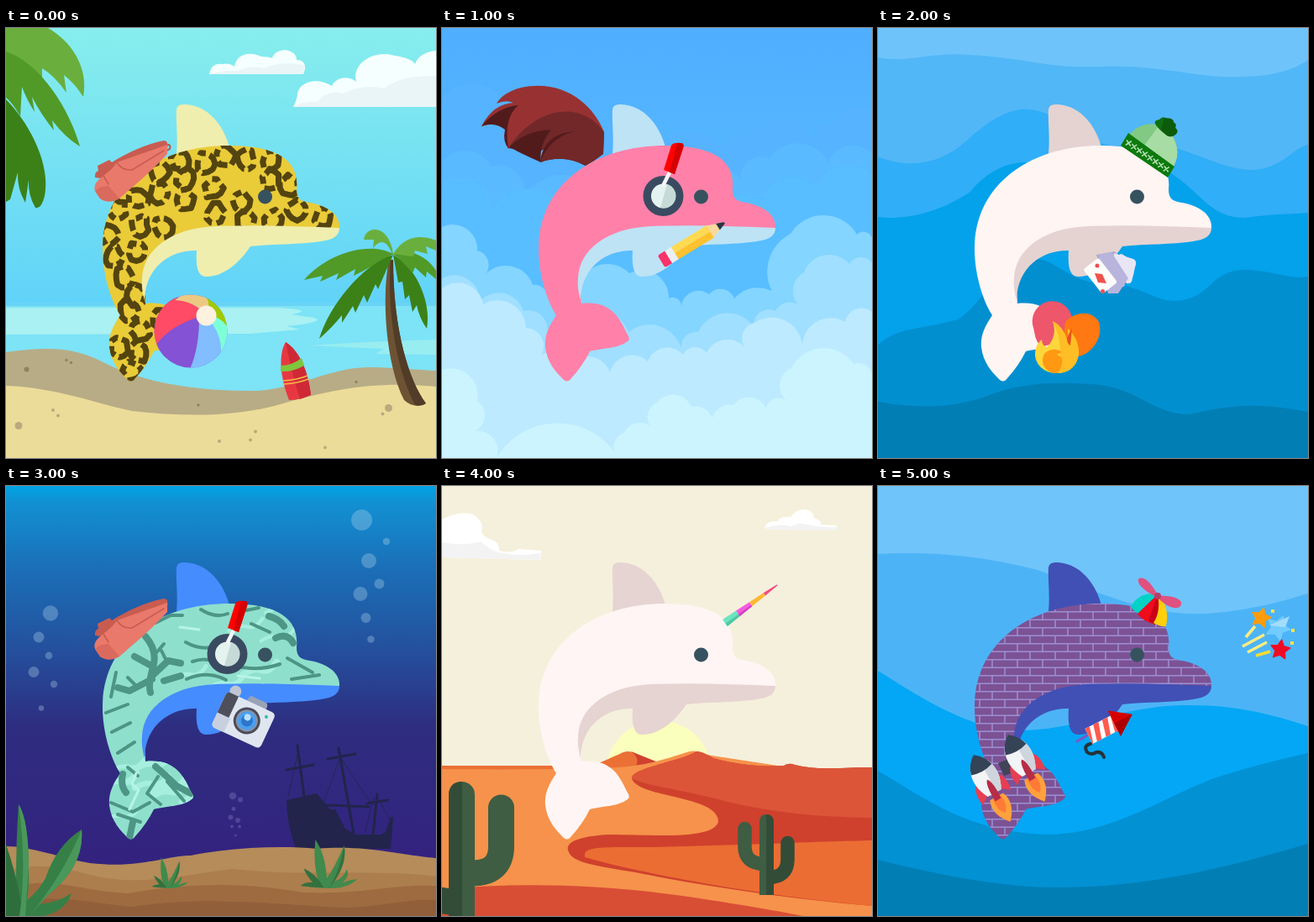
Animation of 512x512 px, one loop 6000 ms. Source, as an HTML page:

```html
<!DOCTYPE html>
<html lang="en">
<head>
<meta charset="utf-8">
<title>Dolphins</title>
<style>
html, body { margin: 0; width: 100%; height: 100%; overflow: hidden; }
svg { display: block; width: 100vw; height: 100vh; }
</style>
</head>
<body>
<svg id="stage" viewBox="0 0 512 512"></svg>
<script>
const p = (fill, d, more = '') => `<path fill="${fill}" d="${d}" ${more}/>`;
const ln = (color, w, d, cap = 'round') =>
  `<path fill="none" stroke="${color}" stroke-width="${w}" stroke-linecap="${cap}" stroke-linejoin="round" d="${d}"/>`;
const dot = (fill, x, y, r) => `<circle fill="${fill}" cx="${x}" cy="${y}" r="${r}"/>`;
const dots = (fill, list) => list.map(a => dot(fill, ...a)).join('');
const at = (x, y, deg, s) => `<g transform="translate(${x} ${y}) rotate(${deg})">${s}</g>`;
const sky = fill => p(fill, 'M0 0H512V512H0Z');
const land = (fill, d) => p(fill, d + 'V512H0Z');
const grad = (id, stops) => `<linearGradient id="${id}" x2="0" y2="1">` +
  stops.map(([o, c]) => `<stop offset="${o}" stop-color="${c}"/>`).join('') + '</linearGradient>';

let seed = 7;
const rnd = () => (seed = seed * 16807 % 2147483647) / 2147483647;

const BODY = 'M397 238C398 224 385 212 362 208C350 206 346 203 346 192C349 163 331 140 266 140C180 140 115 187 115 263C115 292 124 323 136 342C126 357 122 367 123 380C125 399 137 411 145 419Q150 423 154 417C163 407 170 397 176 385C190 381 210 382 221 373Q224 371 222 367C213 351 206 324 166 328L164 290L250 240Z';
const BELLY = 'M166 328C163 318 161 308 162 298C163 265 195 238 250 236C300 234 350 236 397 238C397 247 390 252 375 254C350 258 320 257 291 260C278 280 258 297 237 296C227 295 226 280 227 265C195 264 167 285 165 322Z';
const FIN = 'M203 150C205 130 202 110 203 97Q204 90 213 91C241 92 259 116 266 142Z';

const dolphin = (skin, belly, texture = '') =>
  p(belly, FIN) + p(skin, BODY) + `<g clip-path="url(#skin)">${texture}</g>` +
  p(belly, BELLY) + dot('#37525f', 308.5, 201, 8.5);

// skins
function rosette([x, y]) {
  const n = 11, turn = rnd() * 7, pts = [];
  for (let i = 0; i < n; i++) {
    const a = turn + i / n * 6.283, r = 8.5 + rnd() * 4;
    pts.push((x + r * Math.cos(a)).toFixed(1) + ' ' + (y + r * 1.1 * Math.sin(a)).toFixed(1));
  }
  return `<path fill="none" stroke="#54440f" stroke-width="7" stroke-linejoin="round" stroke-dasharray="20 5 13 6 9 5" d="M${pts.join('L')}Z"/>`;
}
const leopard = () => [
  [183, 172], [208, 158], [238, 160], [286, 157], [316, 157], [182, 197], [213, 205], [247, 191],
  [279, 206], [315, 181], [132, 216], [159, 236], [187, 237], [213, 180], [250, 221], [285, 230],
  [345, 217], [378, 224], [124, 246], [128, 273], [157, 267], [140, 297], [154, 318], [147, 336],
  [160, 361], [135, 381], [158, 386], [150, 409], [318, 228], [337, 188], [262, 152], [158, 203], [184, 346]
].map(rosette).join('');

function camo() {
  const dark = '#4d9585', light = '#a6efdf';
  let s = '';
  for (let i = 0; i < 34; i++) {
    const x = 115 + rnd() * 235, y = 140 + rnd() * 260;
    s += ln(light, 4 + rnd() * 4, `M${x} ${y}q12 -8 22 -5t18 -10`);
  }
  s += ln(dark, 8, 'M166 179Q181 196 175 216T172 246M173 214L153 203M174 226L193 208L208 211M174 230L147 244L133 240M188 232L208 226M313 155Q325 158 331 167M321 181Q335 174 342 187M139 343Q136 357 143 365M178 334Q191 345 203 357L220 366M151 400L147 419');
  s += ln(dark, 4, 'M176 202L188 188M192 210L185 196M157 240L145 228M178 163L196 154L210 154M232 147Q249 158 264 152M214 186Q237 199 258 187M222 209Q243 202 253 214M215 230Q240 219 262 231M286 148L301 145M292 164L314 174M270 213Q299 222 326 212M335 205L365 222M340 230L373 225M131 222L125 251M119 270L145 260M126 293L148 282M133 318L153 305M145 335L157 345M181 346L168 366L184 379M192 352L212 375M125 377L151 388L171 377M133 391L160 400');
  return s + ln('#b7f5e6', 3, 'M155 342L150 355L158 362L147 385M276 226L302 229M207 168L230 171');
}

const gradients = [
  grad('beachSky', [[0, '#87eeed'], [1, '#4cc4ff']]),
  grad('air', [[0, '#50aeff'], [.5, '#57bbff']]),
  grad('deep', [[0, '#00a3e4'], [.04, '#1290d2'], [.2, '#1b6db6'], [.38, '#24509d'], [.56, '#2e2d80'], [.85, '#33237f']])
].join('');
const defs = `<defs>${gradients}<clipPath id="skin"><path d="${BODY}"/></clipPath>
<clipPath id="ball"><circle cx="220" cy="361" r="43.5"/></clipPath>
<pattern id="bricks" width="30" height="19" y="149" x="9" patternUnits="userSpaceOnUse">
<path d="M0 .7H30M0 10.2H30M7 0V10M22 10V19" stroke="#9c8fd4" stroke-width="1.5"/></pattern></defs>`;

// props
const bag = p('#c95c50', 'M106 178Q105 172 110 170L109 164L123 157L126 160C145 148 168 138 188 134Q194 134 192 144L180 150L120 180Z') +
  p('#e8796b', 'M106 194C102 180 122 176 132 160C152 153 172 146 192 139V150C172 172 150 190 135 203Q122 210 112 203Z') +
  p('#da6a5d', 'M106 194Q112 188 122 188L135 203Q122 210 112 203Z') +
  ln('#c95c50', 1.5, 'M132 160Q138 170 150 169L188 146M116 176L122 186');
const gauge = dot('#3a4b61', 263.5, 200, 24) + dot('#e5f3f0', 263.5, 200, 14.5) +
  p('#c6dad8', 'M268 186A14.5 14.5 0 0 1 260 214Z') + ln('#f4f6f6', 4.5, 'M264 186L271 172') +
  p('#f00', 'M273 140Q275 136 285 137Q289 138 287 143L277 174L264 169Z') +
  p('#d40000', 'M280 137H285Q289 138 287 143L277 174L271 172Z');

function beach() {
  const palmLeft = p('#6aaf3d', 'M0 0H50C77 15 99 47 92 82Q82 66 69 56L72 77Q57 56 43 48L43 63Q22 38 0 30Z') +
    p('#519a28', 'M0 28C42 42 76 98 88 141Q71 131 55 110L57 122Q41 102 31 82L34 100Q24 84 19 70L17 105Q7 88 0 83Z') +
    p('#3c8118', 'M0 85C32 118 53 166 46 200Q42 216 35 214Q26 199 27 181L23 208Q13 191 14 172L5 204L0 207Z');
  const palm = p('#6d5334', 'M456 276C447 320 452 400 474 443Q486 454 500 447C480 420 461 360 461 276Z') +
    p('#513c27', 'M458 276C454 330 462 400 487 449Q495 451 500 447C480 420 461 360 461 276Z') +
    p('#6aaf3d', 'M460 270Q451 245 437 262L438 252L426 252C428 237 446 236 454 249Q460 258 461 270Z') +
    p('#519a28', 'M461 269C430 253 381 270 355 300L377 295L374 302L396 292L393 300L416 287L414 295Q440 282 461 269Z') +
    p('#3c8118', 'M461 270C425 281 385 330 373 370Q388 357 400 342L400 351L413 331L416 339L426 318L430 327L440 305L443 311Q452 290 461 270Z') +
    p('#3c8118', 'M461 270C490 285 507 330 501 358Q492 345 489 330L484 338L480 318L475 323L472 302L467 303Z') +
    p('#519a28', 'M461 269C475 262 500 269 512 289V299L501 290L500 297L487 285L484 292Q472 277 461 269Z') +
    p('#6aaf3d', 'M461 269Q479 240 512 253V265L500 260L502 269L487 265L485 272Z');
  const board = p('#e73842', 'M333 374C326 385 324 410 337 443Q350 443 363 437C360 410 350 385 333 374Z') +
    p('#cf2936', 'M333 374Q340 410 350 442L363 437C360 410 350 385 333 374Z') +
    p('#7fc53d', 'M327 402Q340 402 352 393L355 402Q341 410 327 409Z') +
    ln('#f3ba45', 1.5, 'M330 420Q347 419 359 414M331 424Q348 423 360 418');
  const ball = `<g clip-path="url(#ball)">` + sky('#8452d5') +
    p('#82bdff', 'M230 345Q230 385 217 410L270 410V345Z') +
    p('#7dffd7', 'M240 345Q258 365 256 390L275 380V340L260 336Z') +
    p('#a1c900', 'M238 342Q254 342 264 356V310H232Z') +
    p('#ff4b66', 'M238 342Q195 352 176 381L165 320L204 322Q224 326 238 342Z') +
    p('#ecc983', 'M238 342Q224 325 201 324L220 310L237 320Q245 326 238 342Z') + '</g>' +
    dot('#fff1e0', 238.5, 342.5, 12);
  return sky('url(#beachSky)') + p('#7de3f7', 'M0 328H512V512H0Z') + p('#69d3f6', 'M0 327H512V331H0Z') +
    p('#a9f1f2', 'M0 333H325Q370 336 340 341L367 345Q382 350 334 355L350 359L290 364L0 365Z') +
    p('#98edf1', 'M360 378L430 374L512 371V389L440 388L450 382Z') +
    p('#f5ffff', 'M342 94Q346 86 347 80C347 65 370 57 388 69C395 56 410 58 417 64C411 41 440 25 463 33Q483 36 487 43Q492 29 512 27V94Z') +
    p('#eaf5f7', 'M342 94Q355 86 370 88Q382 73 402 78Q425 66 450 72Q470 56 512 57V94Z') +
    p('#f5ffff', 'M242 55C244 47 247 42 258 43Q266 41 272 46C274 31 290 27 304 34Q313 34 317 36C319 27 332 24 339 28Q346 31 346 38Q357 38 356 49L354 55Z') +
    p('#eaf5f7', 'M242 55Q260 50 276 51Q290 44 307 48Q325 39 356 44L354 55Z') +
    land('#b8ac86', 'M0 386C60 378 85 382 120 400C170 425 240 433 300 432C350 428 385 405 430 404C460 404 490 407 512 408') +
    land('#ecdc99', 'M0 426C60 428 110 448 150 456C220 464 280 462 330 447C390 430 440 420 512 427') +
    dots('#bca97e', [[15, 473.5, 4.5], [56, 455, 2], [62, 461.5, 2], [254, 492, 2], [291, 490.5, 2], [297, 480.5, 2], [380, 499.5, 2], [455.5, 452.5, 4.5], [448.5, 459.5, 2]]) +
    dots('#8f8462', [[24.5, 406.5, 3], [72, 395.5, 1.7], [77.5, 398.5, 1.7], [229, 449, 1.7], [417, 421.5, 1.7]]) +
    palmLeft + board + palm + dolphin('#eacb38', '#efeeae', leopard()) +
    ln('#b25a51', 2, 'M190 140Q197 137 195 144L191 146') + bag + ball;
}

function clouds() {
  const puff = (fill, [x, y, ...rest]) => {
    let d = `M0 512V${y}H${x}`;
    for (let i = 0; i < rest.length; i += 2) {
      const r = Math.hypot(rest[i] - x, rest[i + 1] - y) * .58;
      [x, y] = [rest[i], rest[i + 1]];
      d += `A${r} ${r} 0 0 1 ${x} ${y}`;
    }
    return p(fill, d + 'V512Z');
  };
  const wing = p('#983232', 'M193 124C180 90 143 60 94 71Q72 77 65 90Q76 85 85 89Q61 90 47 117Q65 111 77 118Q74 135 79 144Q98 125 119 126Q150 109 193 124Z') +
    p('#722828', 'M193 124C165 101 125 91 79 143Q96 133 119 146Q153 118 192 150Z') +
    p('#511b1c', 'M47 117Q66 94 91 92Q73 107 79 143Q98 121 130 121Q115 140 118 160Q100 152 90 147Q84 143 79 143Q72 135 75 121Q62 111 47 117Z') +
    p('#722828', 'M193 124C165 84 110 95 79 143Q98 122 131 121Q151 117 192 129Z') +
    p('#511b1c', 'M192 128C150 116 120 127 117 160Q145 150 171 164Q183 157 192 150Z') +
    p('#722828', 'M193 124C155 115 127 132 117 160Q145 150 171 164Q184 157 192 149Z');
  const pencil = at(262, 277.5, -31.5,
    p('#fa3268', 'M2 -8.5H9V8.5H2Q-1 8.5 -1 6V-6Q-1 -8.5 2 -8.5Z') + p('#eceff1', 'M9 -8.5H18V8.5H9Z') +
    p('#ffda52', 'M18 -8.5H68V0H18Z') + p('#ffc22d', 'M18 0H68V8.5H18Z') +
    p('#f9d99d', 'M67 -8.5L88 0L67 8.5Z') + p('#283743', 'M78 -4.5L86 -1.5Q89 0 86 1.5L78 4.5Z'));
  return sky('url(#air)') +
    puff('#55b3ff', [0, 84, 76, 93, 117, 135, 180, 125, 260, 140, 340, 153, 367, 127, 440, 132, 468, 117, 512, 100]) +
    puff('#59baff', [0, 160, 58, 165, 98, 202, 190, 200, 355, 180, 390, 155, 460, 160, 512, 150]) +
    puff('#58beff', [0, 185, 60, 215, 150, 220, 300, 250, 380, 205, 446, 190, 512, 175]) +
    puff('#84d5ff', [0, 237, 42, 265, 51, 294, 108, 306, 125, 328, 163, 306, 223, 292, 270, 322, 285, 331, 318, 317, 348, 322, 410, 333, 415, 245, 494, 246, 512, 250]) +
    puff('#a0dfff', [0, 298, 45, 325, 97, 337, 125, 365, 160, 350, 222, 362, 286, 386, 305, 362, 371, 355, 397, 337, 430, 335, 431, 291, 485, 281, 512, 280]) +
    puff('#bdeaff', [0, 310, 49, 329, 100, 357, 118, 390, 150, 401, 200, 410, 245, 397, 287, 389, 315, 387, 362, 382, 372, 351, 429, 378, 480, 350, 512, 338]) +
    puff('#ccf4ff', [0, 407, 42, 444, 39, 480, 65, 512, 210, 512, 217, 482, 252, 478, 256, 446, 297, 451, 322, 477, 347, 449, 386, 453, 411, 444, 416, 405, 490, 400, 512, 418]) +
    wing + dolphin('#ff81a9', '#bee3f5') + gauge + pencil;
}

function sea() {
  const beanie = p('#82c983', 'M299 127C315 108 346 109 355 137Q358 151 352 165Z') +
    p('#a8dca5', 'M334 117Q351 122 356 143Q358 153 352 165L317 140Z') +
    p('#10700f', 'M330 114Q328 110 335 109Q339 104 344 108Q350 107 351 112Q356 113 354 119Q359 123 354 127Q349 131 344 128Q333 120 330 114Z') +
    p('#0b5b0b', 'M341 107Q353 107 352 113Q356 114 354 119Q359 123 354 127Q349 131 344 128L337 121Z') +
    p('#0c7a0c', 'M298 125L353 165L345 178L289 140Z') +
    ln('#b5dfb2', 1.6, Array.from({length: 8}, (_, i) => `M${296.4 + i * 6.4} ${134 + i * 4.4}l4 6m1 -5l-6 4`).join(''));
  const card = (x, y, a, color) => at(x, y, a, `<rect x="-11" y="-18" width="23" height="37" rx="3" fill="${color}"/>`);
  const cards = card(288, 289, 33, '#e5e4f3') + card(279, 291, -10, '#d5d1ec') + p('#aaa6ce', 'M260 270L282 266L305 292Q300 306 290 303L285 316L276 316Z') +
    p('#e8e6f5', 'M281 268L304 275Q308 277 307 281L302 302Q300 305 296 304L280 284Z') + p('#b9b4dc', 'M262 270L278 267L298 298L286 316L274 316Z') +
    card(264, 295, -38, '#fffdfc') + p('#ef524c', 'M258 292L267 293L272 304L262 303Z') + dots('#ef524c', [[261, 283, 2.5], [267.5, 313.5, 2.5]]);
  const fire = dot('#ee566b', 207.5, 349, 23.8) + p('#ee566b', 'M185 350Q185 370 194 380L222 372Z') +
    p('#ff7811', 'M223 350C235 337 255 336 263 350C269 368 254 389 238 391L220 376Z') +
    p('#fdd63c', 'M208 349Q220 355 225 371Q227 365 226 358Q239 370 239 386C238 402 228 411 213 411C198 411 187 401 187 388Q187 377 195 371Q195 378 201 380Q214 367 208 349Z') +
    p('#ffbd26', 'M208 349Q220 355 225 371Q227 365 226 358Q239 370 239 386C238 402 228 411 213 411Q223 378 208 349Z') +
    p('#ff9812', 'M213 411C202 411 195 403 196 394Q197 385 207 383Q214 382 219 386L213 389Q221 391 219 400Q217 408 213 411Z') +
    p('#e94f1c', 'M231 357L229 378Q225 376 225 369Z');
  return sky('#6ec4fa') +
    land('#52b7f7', 'M0 35C40 42 60 28 110 32C180 36 200 48 260 46C330 42 380 60 430 58C470 58 495 50 512 38') +
    land('#30aef7', 'M0 153C40 170 80 160 110 130C150 95 175 90 205 104C240 125 265 145 300 140C355 128 400 170 447 169C484 166 494 142 512 139') +
    land('#03a2eb', 'M0 225C40 230 80 215 110 195C130 170 155 160 175 160C220 170 310 140 352 175C388 200 397 226 437 226C470 221 490 222 512 220') +
    land('#028fd0', 'M0 377C25 355 50 360 95 347C125 330 145 275 178 273C213 272 225 306 280 305C315 308 330 325 353 325C397 323 395 289 435 288C470 288 490 300 512 296') +
    land('#017fb5', 'M0 445C60 455 90 450 125 440C170 420 220 421 265 425C310 431 330 460 370 460C410 452 440 443 512 457') +
    dolphin('#fff5f3', '#e5d3d1') + beanie + cards + fire;
}

function wreck() {
  const weed = (x, y, k) => `<g transform="translate(${x} ${y}) scale(${k})">` +
    p('#3f8a4c', 'M-33 0Q-27 -5 -18 -4Q-26 -13 -29 -21Q-17 -15 -11 -5Q-18 -25 -15 -56Q-3 -39 -1 -9Q9 -23 20 -49Q24 -29 8 -5Q20 -10 23 -20Q28 -13 17 -3Q27 -8 36 -8Q29 -1 16 2Q0 5 -33 0Z') +
    p('#35703f', 'M-33 0Q-27 -5 -18 -4Q-26 -13 -29 -21Q-14 -15 -5 2Q-20 2 -33 0ZM2 2Q14 -16 20 -49Q24 -29 8 -5Z') + '</g>';
  const bigWeed = p('#368047', 'M0 427Q8 455 12 471Q12 420 15 379Q27 398 27 455Q28 478 25 493Q38 483 47 467Q60 428 90 409Q94 453 49 488L39 498Q62 496 78 485Q71 506 45 512H0Z') +
    p('#2e6e3c', 'M0 427Q13 463 21 512H0Z') + p('#4a975b', 'M15 379Q27 398 27 455L23 512H16Q25 450 15 379ZM90 409Q94 453 49 488L28 512Q70 460 90 409Z');
  const ship = p('#22244b', 'M334 374L370 366L386 385H392L404 408L417 415H447L452 412L458 394L461 394L458 432H345Q334 401 334 374Z') +
    ln('#22244b', 3, 'M347 309L355 370M396 312L414 414M442 367L437 415M334 338L366 332M383 325L416 319M382 380L432 382M430 378L455 374') +
    ln('#22244b', .8, 'M347 320L336 370M397 325L379 375M400 326L436 380M443 372L457 397M438 371L427 413');
  const camera = at(284, 276, 25,
    p('#9aa2b5', 'M-4 -27H15Q19 -27 19 -22V-16H-8Z') + dot('#c0c6d3', -23, -24, 7) +
    `<rect x="-32" y="-20" width="64" height="46" rx="5" fill="#e0e6f0"/>` + p('#4d4f5b', 'M-27 -20H-17V8H-32V-15Q-32 -20 -27 -20Z') +
    p('#c8d0df', 'M-32 8H-15L-15 26H-27Q-32 26 -32 21Z') + dot('#4b4c59', 4, 2, 16) + dot('#8a94a6', 4, 2, 13) +
    dot('#4a9ff0', 4, 2, 11) + dot('#2c76ca', 4, 2, 7) + dot('#b8e1ff', 3, -2, 4) + dot('#32c1ac', 23, -12, 2));
  return sky('url(#deep)') +
    `<g fill-opacity=".33">` + dots('#b5d8ed', [[423.5, 40.5, 12.5], [453, 66, 4.3], [432, 89, 9], [444.5, 116.5, 6], [422, 128.5, 8.5], [428.5, 157, 6], [434.5, 182.5, 4.3], [53, 151.5, 9.2], [39, 180, 6.5], [51, 202, 4.4], [33, 221.5, 6.5], [57, 236, 4.2], [42, 264.5, 3.2]]) + '</g>' +
    `<g fill-opacity=".25">` + dots('#b5a5df', [[270, 369, 4.3], [279, 373.5, 3], [271, 384.5, 2.4], [267.5, 394.5, 3], [276, 398, 3], [269, 405.5, 2], [278, 405.5, 2], [273.5, 416, 1.5]]) + '</g>' +
    ship + land('#b58c5a', 'M0 429C30 429 65 443 100 449C160 456 190 440 220 440C270 430 330 428 370 432C430 427 470 440 512 443') +
    land('#ad7e4d', 'M0 458C30 449 65 452 100 463C160 478 215 462 270 456C360 466 440 455 512 465') +
    land('#9e6b40', 'M0 480C50 462 90 483 145 485C240 469 300 475 355 484C420 487 460 474 512 476') +
    land('#91603b', 'M0 500C50 483 95 496 150 501C250 486 345 501 410 502C450 500 480 491 512 493') +
    bigWeed + weed(194, 477, .62) + weed(383, 476, .98) +
    dolphin('#8fdfcd', '#458cff', camo()) + bag + gauge + camera;
}

function desert() {
  const ridge = 'V335C480 334 450 340 420 332Q413 329 407 333C385 335 350 332 323 324Q310 316 303 316Z';
  const crest = 'M303 316C285 328 226 335 226 348';
  const green = '#3e5d43', dark = '#334c38';
  const horn = at(337, 163, -36,
    p('#6ce5bf', 'M0 -5L19 -4V4L0 5Z') + p('#4fc7a5', 'M0 1L19 1V4L0 5Z') + p('#f45ddd', 'M19 -4L38 -3V3L19 4Z') +
    p('#d63fc2', 'M19 1H38V3L19 4Z') + p('#ffb833', 'M38 -3L58 -2V2L38 3Z') + p('#ef4d83', 'M58 -2L77 -.7V.7L58 2Z'));
  return sky('#f5f0dc') +
    p('#fff', 'M0 40C20 29 43 28 48 48Q44 60 60 64Q69 68 68 77Q80 81 92 75L118 77Q119 84 116 88L0 85Z') +
    p('#f3f3f3', 'M0 67Q26 72 46 66Q60 79 73 80Q92 84 118 80L116 88L0 85Z') +
    p('#fff', 'M384 49Q387 41 400 42Q402 36 415 37Q422 27 433 28Q442 29 443 38Q452 41 451 46L470 47V52L387 52Z') +
    p('#f3f3f3', 'M384 50Q400 44 416 48Q425 42 435 46Q452 50 470 49V53L387 52Z') +
    dot('#faffbd', 258, 342, 63) + p('#eb7036', 'M0 333H180Q205 322 216 317Q224 314 231 319L262 332V350H0Z') +
    p('#cf412d', 'M225 316L262 331L225 340Q240 327 225 316Z') +
    land('#f6924b', 'M0 337C90 338 160 337 210 335C250 332 275 322 295 316Q303 314 308 319L512 350') +
    p('#cf412d', crest + 'C232 372 330 368 329 400C322 422 250 415 200 415C160 417 145 425 151 436C156 448 180 452 230 460C320 478 420 492 512 500' + ridge) +
    p('#dc5538', crest + 'C245 358 290 362 340 376C400 390 450 394 512 395' + ridge) +
    p('#eb6d33', 'M170 440C168 428 200 430 250 430C350 428 430 424 512 422V500C400 490 250 465 170 442Z') +
    land('#d84e35', 'M0 480C100 471 200 475 300 490C360 499 410 508 430 512') +
    ln(dark, 31, 'M-10 492L16 496', 'butt') + ln(green, 31, 'M70.5 383V430Q70 461 36 461') + ln(green, 31, 'M23.5 367.5V520') +
    p(dark, 'M8 512V367Q9 352 24 352V512Z') +
    ln(green, 16.5, 'M360.5 408V430Q361 450 384 450') + ln(dark, 16.5, 'M411.5 425V445Q411 466 389 466') +
    p(green, 'M378 487V400Q378 391 386 391V487Z') + p(dark, 'M386 487V391Q395 391 395 400V487Z') +
    dolphin('#fff5f4', '#e6d4d2') + horn;
}

function party() {
  const rocket = (x, y) => at(x, y, -29,
    p('#e83e51', 'M-12 30Q-23 38 -19 57L-8 49H8L19 57Q23 38 12 30Z') +
    p('#ffa13c', 'M-9 56Q-16 73 0 90Q16 73 9 56Z') + p('#ff7a36', 'M-5 57Q-8 70 0 78Q8 70 5 57Z') +
    p('#f2f4f6', 'M-12 13Q-20 31 -9 51H9Q20 31 12 13Z') + p('#cfd5dc', 'M3 13H12Q20 31 9 51H3Z') +
    p('#344355', 'M0 -1Q11 7 14 19Q0 24 -14 19Q-11 7 0 -1Z') + p('#b72d46', 'M0 33Q5 37 4 60H-4Q-5 37 0 33Z'));
  const star = (fill, x, y, r, a) => at(x, y, a, p(fill, 'M' + Array.from({length: 10}, (_, i) => {
    const k = i % 2 ? r * .5 : r, b = i * Math.PI / 5;
    return `${(k * Math.sin(b)).toFixed(1)} ${(-k * Math.cos(b)).toFixed(1)}`;
  }).join('L') + 'Z', `stroke="${fill}" stroke-width="1.5" stroke-linejoin="round"`));
  const cap = p('#00d2c6', 'M301 144C307 132 319 126 333 129L314 154Q306 151 301 144Z') +
    p('#f00b1d', 'M333 129L309 152Q316 162 329 164Q338 150 333 129Z') +
    p('#c90018', 'M333 129L322 161L330 165Q339 150 333 129Z') +
    p('#ffd00a', 'M333 129Q348 144 343 167Q336 168 328 163Q337 149 333 129Z') +
    p('#e0517f', 'M332 132C317 126 306 114 311 110C319 107 327 119 334 131C348 130 363 134 361 141C358 150 343 144 332 132Z') +
    dot('#b83c68', 333, 131, 4);
  const firework = ln('#7e57c2', 3, 'M237 304L252 295') + ln('#263238', 4, 'M253 307Q244 309 249 317Q254 321 260 317Q267 316 269 323') +
    at(251, 298, -27, p('#fff', 'M0 -10H37V10H0Z') +
      p('#ff5a50', 'M0 -10H6L1 10H0ZM11 -10H18L12 10H6ZM23 -10H30L24 10H18ZM34 -10H37V10H30Z') +
      p('#d50000', 'M34 -17L58 0L34 17Z') + p('#ad0000', 'M34 0H58L34 17Z'));
  return sky('#6fc4fa') +
    land('#4cb4f6', 'M0 81C60 78 120 82 190 100C260 125 320 155 390 152C440 149 480 138 512 128') +
    land('#03a7f5', 'M0 220C40 245 80 272 135 288C215 302 280 262 365 261C425 260 470 272 512 286') +
    land('#0291d3', 'M0 339C60 375 110 412 200 415C280 414 330 375 400 348C440 335 480 325 512 318') +
    land('#017fb5', 'M0 445C80 465 150 478 215 478C330 478 430 450 512 426') +
    dolphin('#7c5294', '#4150b5', p('url(#bricks)', 'M100 130H400V425H100Z')) + cap + firework +
    p('#414358', 'M143 330L158 324L165 340L150 345Z') + rocket(155, 297) + rocket(114, 321) +
    ln('#ffec80', 3.5, 'M438 180L449 167M434 191L460 177M440 198L463 186', 'butt') + ln('#ffdb2e', 3.5, 'M450 202L467 197', 'butt') +
    p('#ffe34a', 'M468 147h4v4h-4zM492 170h4v4h-4zM491 185h4v4h-4z') +
    star('#72ccff', 476, 169, 15, 25) + p('#a5dcfc', 'M490 155L485 168L466 166Z') + star('#ff9c0a', 456, 157, 12, 15) + star('#f00b24', 479, 195, 12, 8);
}

const stage = document.getElementById('stage');
stage.innerHTML = defs + [beach, clouds, sea, wreck, desert, party].map(draw => `<g class="scene">${draw()}</g>`).join('');
const scenes = [...stage.querySelectorAll('.scene')];

function show(ms) {
  const now = Math.floor(ms / 1000) % scenes.length;
  scenes.forEach((s, i) => s.style.display = i === now ? '' : 'none');
}
function tick() {
  show(performance.now());
  requestAnimationFrame(tick);
}
tick();
</script>
</body>
</html>
```
